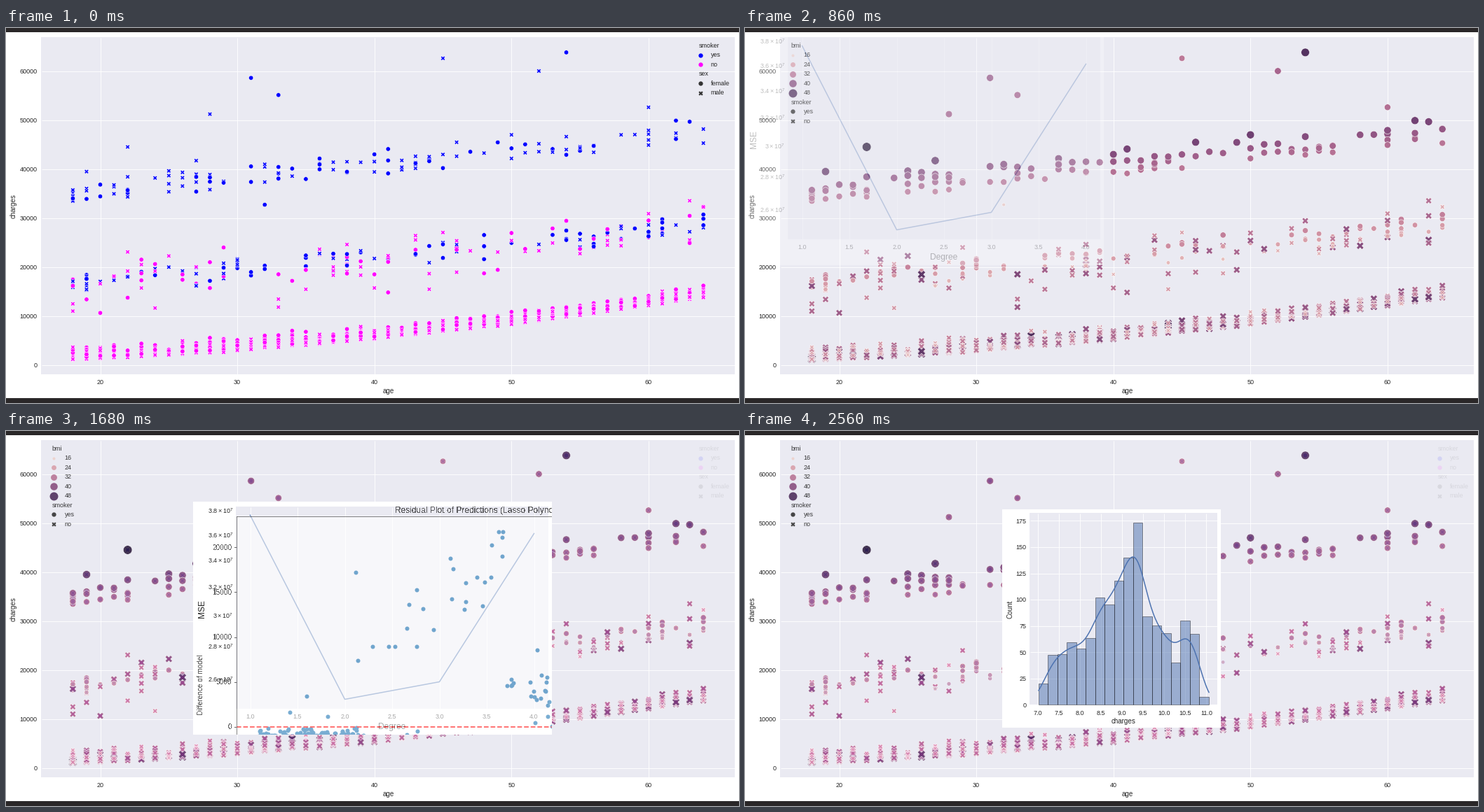
A matplotlib script that plays this animation: 1046 by 536 pixels, repeating every 2660 ms.

```python
import numpy as np
import matplotlib.pyplot as plt
from matplotlib.animation import FuncAnimation
from matplotlib.markers import MarkerStyle

W, H = 1046, 536
PX = 0.72                     # points per pixel at 100 dpi
TICK = 20                     # ms per animation frame
HOLD, STEP, SPAN = 100, 60, 640
LOOP = 2660

INK = "#262626"
PANEL = "#eaeaf2"
DARK = "#2a2728"
KEY = "#333333"
SOFT_BLUE = "#4c72b0"
DOT_BLUE = "#1f77b4"

plt.rcParams.update({
    "font.family": "Liberation Sans",
    "mathtext.fontset": "custom",
    "mathtext.rm": "Liberation Sans",
})
fig = plt.figure(figsize=(W / 100, H / 100), dpi=100)
rng = np.random.default_rng(11)


# ---------- data: age, charge in thousands, male, smoker, bmi ----------

LANDMARKS = [
    (22, 44.5, 1, 1, 52.6), (28, 51.2, 1, 1, 36), (31, 58.6, 0, 1, 38),
    (33, 55.1, 0, 1, 35.5), (45, 62.6, 1, 1, 31), (52, 60.0, 1, 1, 35),
    (54, 63.8, 0, 1, 47.4), (60, 52.6, 1, 1, 33), (32, 32.7, 0, 1, 17.8),
    (18, 1.2, 1, 0, 53),
]


def base_charge(age):
    return 0.04 + 0.00337 * age ** 2


def ordinary(age):
    male = rng.random() < 0.5
    kids = rng.choice(6, p=(.43, .24, .18, .11, .03, .01))
    charge = base_charge(age) + 0.4 * (not male) + 0.5 * kids + rng.normal(0, 0.1)
    return age, charge, male, 0, np.clip(rng.normal(30.7, 6), 16, 48)


def costly(age):
    charge = base_charge(age) + rng.triangular(7, 16, 22)
    return age, charge, rng.random() < 0.5, 0, np.clip(rng.normal(32, 5), 20, 46)


def slim_smoker(age):
    bmi = rng.triangular(18, 28, 30)
    return age, 18.6 + 0.265 * (age - 18) - 0.45 * (30 - bmi), rng.random() < 0.55, 1, bmi


def obese_smoker(age):
    bmi = rng.triangular(31, 34, 46)
    return age, 32.5 + 0.26 * (age - 18) + 0.45 * (bmi - 30), rng.random() < 0.6, 1, bmi


people = list(LANDMARKS)
for make, mean in ((ordinary, 21), (costly, 2.2), (slim_smoker, 2.4), (obese_smoker, 2.8)):
    for years in range(18, 65):
        crowd = mean * (2 if years < 20 else 1)
        people += [make(years) for _ in range(rng.poisson(crowd))]
people = np.array(people, float)[rng.permutation(len(people))]
age, charge, male, smoker, bmi = people.T


# ---------- drawing helpers, all in stage pixels ----------

def marker_path(name):
    m = MarkerStyle(name)
    return m.get_path().transformed(m.get_transform())


SHAPES = [marker_path("o"), marker_path("X")]


def stage():
    ax = fig.add_axes((0, 0, 1, 1))
    ax.set_xlim(-0.5, W - 0.5)
    ax.set_ylim(H - 0.5, -0.5)
    ax.axis("off")
    return ax


def text(ax, x, y, s, size=9, ha="center", color=INK):
    ax.text(x, y + 0.36 * size, s, fontsize=size * PX, ha=ha, va="baseline", color=color)


def side_text(ax, x, y, s, size, color=INK):
    ax.text(x, y, s, fontsize=size * PX, rotation=90, ha="center", va="center", color=color)


def rect(ax, x0, y0, x1, y1, color, **kw):
    kw.setdefault("lw", 0)
    ax.add_patch(plt.Rectangle((x0 - 0.5, y0 - 0.5), x1 - x0, y1 - y0, fc=color, **kw))


def line(ax, xs, ys, color, width, z=1, **kw):
    ax.plot(xs, ys, color=color, lw=width * PX, zorder=z, **kw)


def panel(ax, x0, y0, x1, y1, xs=(), ys=()):
    rect(ax, x0, y0, x1, y1, PANEL)
    for x in xs:
        line(ax, (x, x), (y0, y1 - 1), "w", 0.9, solid_capstyle="butt")
    for y in ys:
        line(ax, (x0, x1 - 1), (y, y), "w", 0.9, solid_capstyle="butt")


def dots(ax, x, y, crossed, color, size, edge=0.55):
    """Circles, or crosses where `crossed`; size is the diameter."""
    crossed = np.broadcast_to(crossed, np.shape(x))
    marks = ax.scatter(x, y, s=(np.asarray(size) * PX) ** 2, c=color,
                       edgecolors="w", linewidths=edge * PX)
    marks.set_paths([SHAPES[int(c)] for c in crossed])


def helix(t):
    """Light pink to dark purple for t from 0 to 1."""
    x = 0.85 - 0.7 * np.asarray(t, float)
    amp = 0.8 * x * (1 - x) / 2
    phi = 2 * np.pi * 0.4 * x
    parts = ((-0.14861, 1.78277), (-0.29227, -0.90649), (1.97294, 0))
    rgb = [x + amp * (p * np.cos(phi) + q * np.sin(phi)) for p, q in parts]
    return np.clip(np.stack(rgb, -1), 0, 1)


def bmi_look(b):
    t = np.clip((np.asarray(b, float) - 16) / 37.1, 0, 1)
    return helix(t), 0.9 * np.sqrt(20 + 180 * t)


# ---------- slides ----------

def age_x(a):
    return 134 + 19.56 * (np.asarray(a) - 20)


def charge_y(k):
    return 481 - 7.0 * np.asarray(k)


def charges_axes(ax):
    rect(ax, 0, 0, W, H, DARK)
    rect(ax, 0, 6, W, 529, "w")
    ages, levels = range(20, 61, 10), range(0, 61, 10)
    panel(ax, 50, 13, 1040, 495, age_x(ages), charge_y(levels))
    for a in ages:
        text(ax, age_x(a), 505.5, str(a))
    for k in levels:
        text(ax, 44, charge_y(k), str(k * 1000), ha="right")
    text(ax, 545, 518, "age", 9.9)
    side_text(ax, 10.5, 254, "charges", 9.9)


def legend(ax, x, label_x, entries):
    """One row per entry: (label, marker), marker None for a heading."""
    for i, (label, marker) in enumerate(entries):
        y = 24.3 + 13.45 * i
        if marker is None:
            text(ax, x - 2, y, label, ha="left")
        else:
            crossed, color, size = marker
            dots(ax, [x], [y + 0.5], crossed, [color], size, 0)
            text(ax, label_x, y, label, ha="left")


def sex_slide(ax):
    charges_axes(ax)
    color = np.where(smoker > 0, "#0000ff", "#ff00ff")
    dots(ax, age_x(age), charge_y(charge), male, color, 6.4)
    legend(ax, 990, 1005, [
        ("smoker", None), ("yes", (0, "#0000ff", 6.3)), ("no", (0, "#ff00ff", 6.3)),
        ("sex", None), ("female", (0, KEY, 6.3)), ("male", (1, KEY, 6.3))])


def bmi_slide(ax):
    charges_axes(ax)
    color, size = bmi_look(bmi)
    dots(ax, age_x(age), charge_y(charge), smoker == 0, color, size)
    sizes = [(str(b), (0, *bmi_look(b))) for b in range(16, 49, 8)]
    legend(ax, 67, 83, [
        ("bmi", None), *sizes,
        ("smoker", None), ("yes", (0, KEY, 6.3)), ("no", (1, KEY, 6.3))])


def degree_slide(ax):
    rect(ax, 267, 101, 779, 434, "w")
    xs = 348 + 67.5 * np.arange(7)
    panel(ax, 328, 108, 774, 397, xs)
    for i, x in enumerate(xs):
        text(ax, x, 407, f"{1 + i / 2:.1f}")
    for tenths in range(26, 39, 2):
        y = 114.5 + 635 * np.log(38 / tenths)
        text(ax, 324, y, rf"$\mathrm{{{tenths / 10:g}\times10^{{7}}}}$", ha="right")
    line(ax, xs[::2], (120, 383, 358, 146), SOFT_BLUE, 1.5, 2)
    text(ax, 550, 421, "Degree", 12)
    side_text(ax, 280, 254, "MSE", 12)


def cloud(n, x, y, dx, dy):
    return np.column_stack([rng.normal(x, dx, n), rng.normal(y, dy, n)])


def residuals():
    """Dense flat band, a rising fan, a low scatter and the high charges."""
    along = rng.random(260) ** 1.25
    band = np.column_stack([212 + 150 * along, rng.normal(338, 5 + 3 * along)])
    fan_x = rng.uniform(345, 560, 25)
    fan_y = np.clip(170 - 0.65 * (fan_x - 415) + rng.normal(0, 38, 25), 42, 280)
    low_x = rng.uniform(368, 518, 30)
    low_y = np.clip(rng.normal(370, 27, 30), 327, 423)
    ends = [(553, 42), (608, 211), (681, 211), (888, 246), (438, 447), (680, 480),
            (279, 277), (255, 300), (309, 306)]
    return np.vstack([
        band, np.column_stack([fan_x, fan_y]), np.column_stack([low_x, low_y]), ends,
        cloud(5, 570, 260, 10, 5), cloud(16, 614, 281, 9, 20),
        cloud(9, 663, 320, 9, 20), cloud(8, 710, 335, 12, 32)])


def residual_slide(ax):
    rect(ax, 179, 20, 922, 503, "w")
    ax.scatter(*residuals().T, s=(6 * PX) ** 2, c=DOT_BLUE, linewidths=0)
    line(ax, (179, 921), (321, 321), "r", 1.8, 2, ls="--")
    line(ax, (179, 921, 921, 179, 179), (20, 20, 502, 502, 20), "k", 0.8, 2)
    for i in range(7):
        x = 200 + 107.8 * i
        line(ax, (x, x), (502, 505), "k", 0.8)
        text(ax, x, 513, str(10000 * i), 10, color="k")
    for v in range(-10, 21, 5):
        y = 321.3 - 12.83 * v
        line(ax, (176, 179), (y, y), "k", 0.8)
        text(ax, 173, y, str(1000 * v).replace("-", "\u2212"), 10, "right", "k")
    text(ax, 549.5, 11, "Residual Plot of Predictions (Lasso Polynomial Model)", 12, color="k")
    text(ax, 549.5, 525.5, "Real charges", 10, color="k")
    side_text(ax, 128, 261, "Difference of model", 10, "k")


def histogram_slide(ax):
    rect(ax, 367, 112, 679, 424, "w")
    xs = 417.5 + 30.06 * np.arange(9)
    levels = np.arange(0, 176, 25)
    ys = 391 - 1.503 * levels
    panel(ax, 406, 117, 674, 391, xs, ys[1:])
    counts = np.array([20, 47, 48, 59, 53, 63, 102, 95, 118, 140, 173, 84,
                       75, 68, 40, 80, 67, 7])
    step = 13.5
    left = 418.5 + step * np.arange(len(counts))
    for x, c in zip(left, counts):
        rect(ax, x, 391 - 1.503 * c, x + step, 391, (0.298, 0.447, 0.69, 0.5),
             ec=(0, 0, 0, 0.5), lw=0.8 * PX)
    u = np.linspace(left[0], left[-1] + step, 160)
    bell = np.exp(-0.5 * ((u[:, None] - left - step / 2) / 13) ** 2)
    curve = bell @ counts * step / (13 * np.sqrt(2 * np.pi))
    line(ax, u, 391 - 1.503 * curve, SOFT_BLUE, 1.5, 2)
    for i, x in enumerate(xs):
        text(ax, x, 402, f"{7 + i / 2:.1f}")
    for v, y in zip(levels, ys):
        text(ax, 401, y, str(v), ha="right")
    text(ax, 540, 413.5, "charges", 9.9)
    side_text(ax, 378, 254, "Count", 9.9)


def snapshot(draw):
    fig.clear()
    draw(stage())
    fig.canvas.draw()
    return np.array(fig.canvas.buffer_rgba()) / 255.0


fig.patch.set_alpha(0)
by_sex, by_bmi, degree, residual, histogram = (
    snapshot(d) for d in (sex_slide, bmi_slide, degree_slide, residual_slide, histogram_slide))


# ---------- crossfades ----------

def mix(a, b, t):
    return a * (1 - t) + b * t


DEGREE_BOX = np.s_[101:434, 267:779]
CORNER_BOX = np.s_[6:339, 0:512]
HIST_BOX = np.s_[112:424, 367:679]
solid = residual[..., 3:] > 0.4          # hard-edged transparency
by_sex, by_bmi, degree, residual, histogram = (
    s[..., :3] for s in (by_sex, by_bmi, degree, residual, histogram))
backdrop = mix(by_sex, by_bmi, 0.9)


def compose(slide, t):
    if slide == 0:
        return mix(by_sex, by_bmi, t)
    if slide == 1:
        out = by_bmi.copy()
        out[CORNER_BOX] = mix(out[CORNER_BOX], degree[DEGREE_BOX], t)
        return out
    out = backdrop.copy()
    if slide == 2:
        crop = np.s_[0:333, 118:630]
        out[DEGREE_BOX] = mix(degree[DEGREE_BOX], residual[crop], t * solid[crop])
    elif slide == 3:
        layer = residual.copy()
        spot = np.s_[0:311, 119:431]
        layer[spot] = mix(layer[spot], histogram[113:424, 367:679], t)
        out = np.where(solid, layer, out)
    else:
        out[HIST_BOX] = histogram[HIST_BOX]
    return out


def frame_image(n):
    slide, rest = divmod(n * TICK, SPAN)
    step = 0 if rest < HOLD else 1 + (rest - HOLD) // STEP
    return np.uint8(np.round(np.clip(compose(slide, step / 10), 0, 1) * 255))


fig.clear()
fig.patch.set_alpha(1)
picture = stage().imshow(frame_image(0), aspect="auto", interpolation="nearest")


def update(n):
    picture.set_data(frame_image(n))
    return [picture]


anim = FuncAnimation(fig, update, frames=LOOP // TICK, interval=TICK,
                     repeat=True, repeat_delay=0, blit=False)
plt.show()
```
